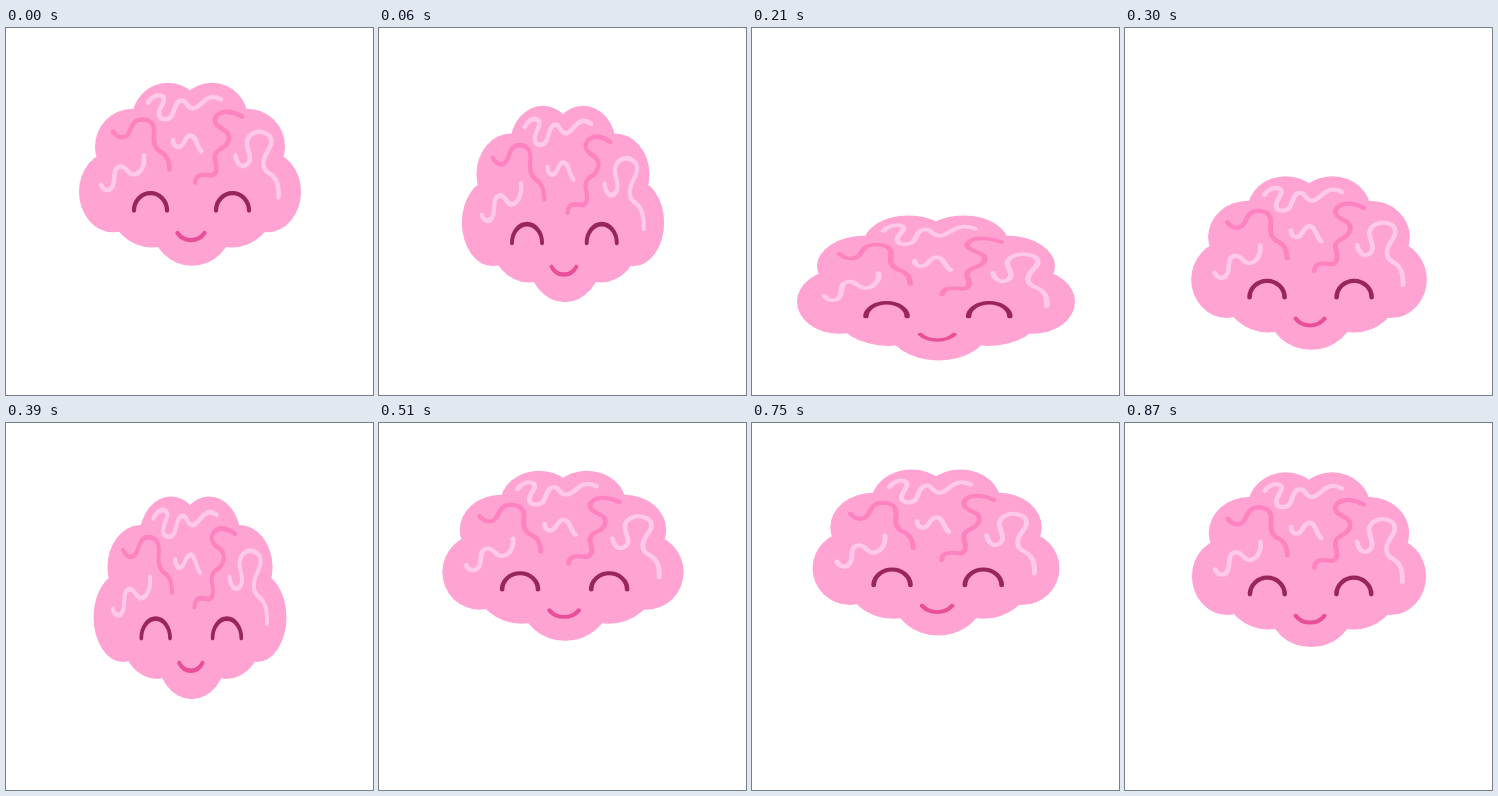
An HTML page that plays this animation: 367x367 px, repeating every 900 ms.

```html
<!DOCTYPE html>
<html lang="en">
<head>
<meta charset="utf-8">
<title>Bouncing brain</title>
<style>
  html, body { margin: 0; width: 100%; height: 100%; overflow: hidden; background: #fff; }
  svg { display: block; width: 100vw; height: 100vh; }
  .body { fill: #ffa3d3; }
  .lines { fill: none; stroke-width: 4.5; stroke-linecap: round; stroke-linejoin: round; }
  .light { stroke: #ffc9e9; }
  .mid { stroke: #ff82c0; }
  .eyes { stroke: #98265b; stroke-width: 4.3; }
  .mouth { stroke: #e94f98; stroke-width: 4.2; }
</style>
</head>
<body>
<svg viewBox="0 0 367 367">
  <g id="brain">
    <g class="body">
      <circle cx="162" cy="90" r="36"/>
      <circle cx="206" cy="90" r="36"/>
      <circle cx="127" cy="117.8" r="38"/>
      <circle cx="241" cy="117.8" r="38"/>
      <ellipse cx="107" cy="163" rx="34" ry="40.5"/>
      <ellipse cx="261" cy="163" rx="34" ry="40.5"/>
      <circle cx="146" cy="176.7" r="42"/>
      <circle cx="226" cy="176.7" r="42"/>
      <circle cx="186" cy="197" r="40"/>
      <ellipse cx="184" cy="140" rx="80" ry="60"/>
    </g>
    <g class="lines">
      <g class="light" transform="translate(0 .7)">
        <path d="M142 73C146 66 153 64 157 67C161 71 152 79 153 85C154 91 163 91 166 86C169 80 169 72 175 71C181 70 180 79 187 79C194 79 198 67 207 67.5C211 67.5 213 69 215 70"/>
        <path d="M95 155C97 161 104 163 107 156C110 149 106 139 114 137C121 136 122 146 128 145C135 144 139 136 138 126"/>
        <path d="M167 110.5C167 116 171 119 175 116.5C179 113 179 107 184 106C191 106 190 117 195.5 122"/>
        <path d="M229.5 126C231 135 236 139 241 135C248 129 240 120 241 112C243 103 252 101 258 103C267 106 267 113 262 121C257 129 255 138 262 143C271 148 273 156 272.5 168"/>
      </g>
      <g class="mid" transform="translate(0 .7)">
        <path d="M107 102C112 109 119 110 123 103C126 97 127 90 136 90C146 90 149 96 148 105C147 113 149 120 156 123C162 127 163 133 163.5 140"/>
        <path d="M236 87C228 82 217 80 211 86C205 93 213 98 219 101C225 105 224 113 217 118C211 121 208 124 209 130C211 137 212 144 206 146C198 145 190 143 189 153"/>
      </g>
      <path class="eyes" d="M128 181.8A16.5 17.5 0 0 1 161 181.8M210 181.8A16.5 17.5 0 0 1 243 181.8"/>
      <path class="mouth" d="M171.5 204.2C178 213.7 192 213.7 198.5 204.2"/>
    </g>
  </g>
</svg>
<script>
  const LOOP = 900, STEP = 30;
  const CX = 184, BASE = 236.5, W = 222, H = 184;
  const brain = document.getElementById('brain');

  // [time, value] keys; times past the loop wrap to its start
  const bottomKeys = [[210, 332], [240, 332], [552, 212], [811, 212], [1104, 332], [1110, 332]];
  const widthKeys = [[210, 278], [240, 278], [363, 190], [548, 247], [808, 247], [985, 200], [1110, 278]];

  const ease = p => (1 - Math.cos(Math.PI * p)) / 2;

  function valueAt(keys, t) {
    if (t < keys[0][0]) t += LOOP;
    const i = Math.max(1, keys.findIndex(k => k[0] >= t));
    const [t0, a] = keys[i - 1], [t1, b] = keys[i];
    return a + (b - a) * ease((t - t0) / (t1 - t0));
  }

  function draw(ms) {
    const t = Math.floor((ms % LOOP) / STEP) * STEP;
    const width = valueAt(widthKeys, t);
    const height = H - (width - W) * 0.682;
    const bottom = valueAt(bottomKeys, t);
    brain.setAttribute('transform',
      `translate(${CX} ${bottom}) scale(${width / W} ${height / H}) translate(${-CX} ${-BASE})`);
  }

  let start;
  function tick(now) {
    start ??= now;
    draw(Math.max(0, now - start));
    requestAnimationFrame(tick);
  }
  draw(0);
  requestAnimationFrame(tick);
</script>
</body>
</html>
```
